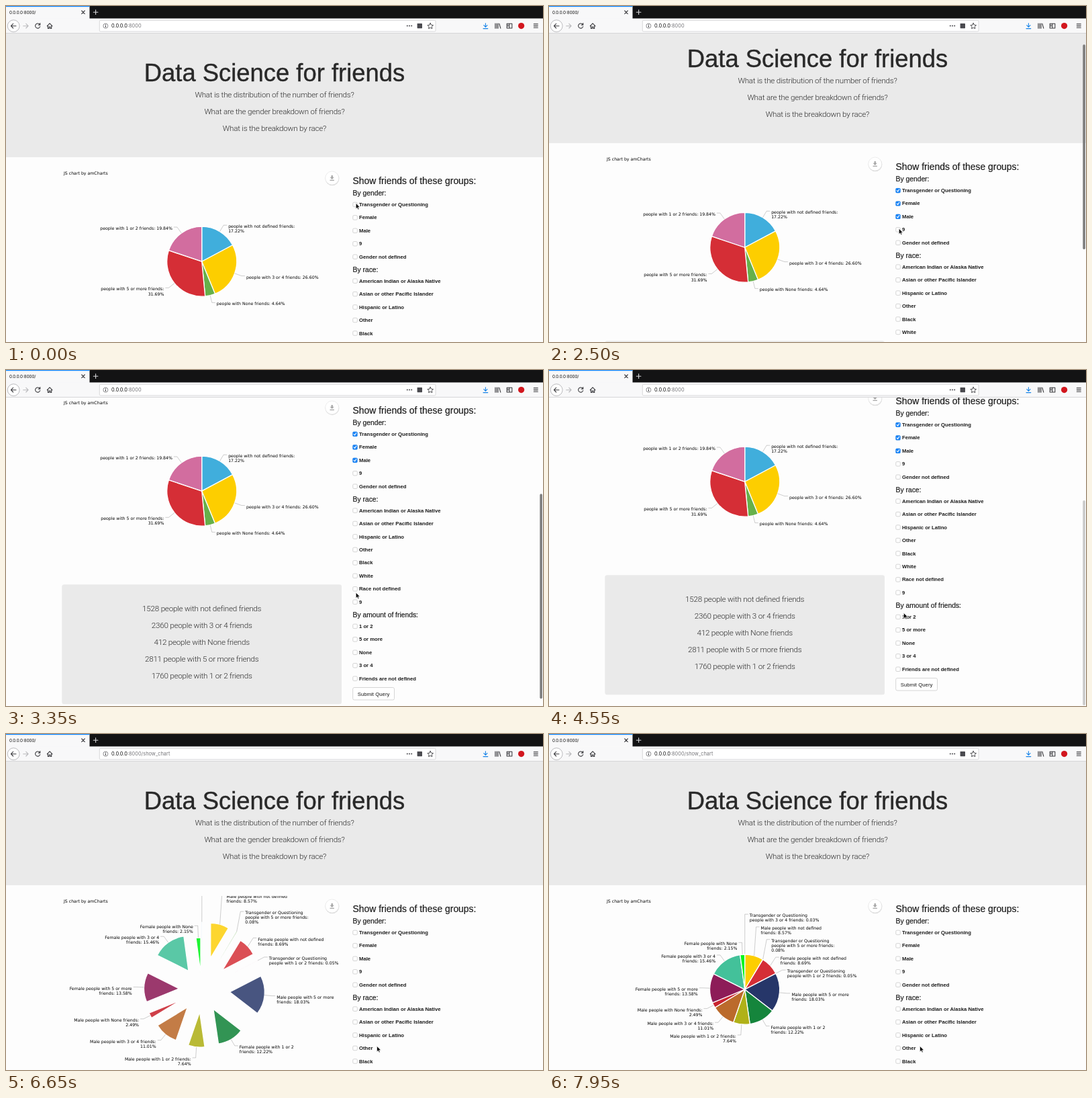
An HTML page that plays this animation: 800 by 500 pixels, repeating every 8 s.

```html
<!DOCTYPE html>
<html lang="en">
<head>
<meta charset="utf-8">
<title>Data Science for friends</title>
<style>
html, body { margin: 0; width: 100%; height: 100%; overflow: hidden; background: #fdfdfd; }
svg { display: block; width: 800px; height: 500px; font-family: "Liberation Sans", Arial, sans-serif; }
text { fill: #1c1c1c; white-space: pre; }
.title { font-size: 36.4px; fill: #292929; stroke: #292929; stroke-width: .4px; text-anchor: middle; }
.lead { font: 300 11.67px Roboto, sans-serif; letter-spacing: -.02em; fill: #2c2c2c; text-anchor: middle; }
.head { font-size: 13.9px; stroke: #1c1c1c; stroke-width: .2px; }
.sub { font-size: 10.3px; stroke: #1c1c1c; stroke-width: .2px; }
.option { font-size: 7.7px; font-weight: bold; }
.button { font-size: 7.8px; }
.chart { font: 6.23px "DejaVu Sans", Verdana, sans-serif; fill: #000; }
.tab { font: 6.2px Inter, sans-serif; fill: #111; }
.url { font: 7.4px Inter, sans-serif; fill: #0c0c0d; }
.line { fill: none; stroke: #3a3a3e; stroke-width: 1.1; stroke-linecap: round; stroke-linejoin: round; }
.tick { fill: none; stroke: #000; stroke-opacity: .32; stroke-width: .6; }
</style>
</head>
<body>
<svg id="stage" viewBox="0 0 800 500"></svg>
<script>
const LOOP = 8000, TOP = 41, MAX_SCROLL = 214;
const CX = 291.7, CY = 380.2, RADIUS = 52, LABEL_RADIUS = 63;
const LOADED = 5900, PIE_START = 6197;

// Slices: percent, colour, label (| breaks the line), vertical label shift
const overview = [
  [17.22, '#40aedc', 'people with not defined friends:|17.22%'],
  [26.60, '#fdce00', 'people with 3 or 4 friends: 26.60%'],
  [4.64, '#66b04a', 'people with None friends: 4.64%'],
  [31.69, '#d52e36', 'people with 5 or more friends:|31.69%'],
  [19.84, '#d26d9f', 'people with 1 or 2 friends: 19.84%']
];
const breakdown = [
  [0.03, '#40aedc', 'Transgender or Questioning|people with 3 or 4 friends: 0.03%', -49],
  [8.57, '#fdce00', 'Male people with not defined|friends: 8.57%', -32.5],
  [0.08, '#66b04a', 'Transgender or Questioning|people with 5 or more friends:|0.08%', -20.5],
  [8.69, '#d52e36', 'Female people with not defined|friends: 8.69%', -5],
  [0.05, '#d26d9f', 'Transgender or Questioning|people with 1 or 2 friends: 0.05%'],
  [18.03, '#263669', 'Male people with 5 or more|friends: 18.03%'],
  [12.22, '#15853c', 'Female people with 1 or 2|friends: 12.22%'],
  [7.64, '#b0b118', 'Male people with 1 or 2 friends:|7.64%', 5],
  [11.01, '#bb6a2b', 'Male people with 3 or 4 friends:|11.01%'],
  [2.49, '#c9252f', 'Male people with None friends:|2.49%'],
  [13.58, '#8d1c58', 'Female people with 5 or more|friends: 13.58%'],
  [15.46, '#43c19a', 'Female people with 3 or 4|friends: 15.46%'],
  [2.15, '#06f51e', 'Female people with None|friends: 2.15%', -7]
];

const text = (x, y, cls, s, extra = '') => `<text x="${x}" y="${y}" class="${cls}" ${extra}>${s}</text>`;
const rect = (x, y, w, h, fill, extra = '') =>
  `<rect x="${x}" y="${y}" width="${w}" height="${h}" fill="${fill}" ${extra}/>`;
const circle = (x, y, r, fill, extra = '') => `<circle cx="${x}" cy="${y}" r="${r}" fill="${fill}" ${extra}/>`;
const line = (d, extra = '') => `<path class="line" d="${d}" ${extra}/>`;
const polar = (turn, r) => [CX + r * Math.sin(turn * 2 * Math.PI), CY - r * Math.cos(turn * 2 * Math.PI)];

function pie(slices) {
  const total = slices.reduce((sum, s) => sum + s[0], 0);
  let from = 0;
  return slices.map(([percent, color, label, shift = 0]) => {
    const to = from + percent / total, mid = (from + to) / 2;
    const side = mid < .5 ? 1 : -1;
    const [ex, ey] = polar(mid, LABEL_RADIUS), y = ey + shift;
    const wedge = `M${CX} ${CY}L${polar(from, RADIUS)}A${RADIUS} ${RADIUS} 0 0 1 ${polar(to, RADIUS)}Z`;
    const stroke = percent < .1 ? 'none' : '#fff';
    const words = label.split('|').map((part, i) =>
      text(ex + 7 * side, y + 4 + i * 7.1, 'chart', part, side < 0 ? 'text-anchor="end"' : '')).join('');
    from = to;
    return `<g class="slice" data-mid="${mid}">
      <path class="wedge" d="${wedge}" fill="${color}" stroke="${stroke}" stroke-width="1.3"/>
      <path class="tick" d="M${polar(mid, RADIUS)}L${ex} ${y}h${5 * side}"/>${words}</g>`;
  }).join('');
}

function options(centerY, labels) {
  return labels.map((label, i) => {
    const y = centerY + i * 19.45;
    return rect(516.8, y - 2.9, 6.5, 6.5, '#fff', 'rx="1.5" stroke="#c2c2c2" stroke-width=".7"') +
      text(526, y + 2.9, 'option', label);
  }).join('');
}

const check = i => {
  const y = 295.3 + i * 19.45;
  return `<g class="check">${rect(516.4, y - 3.4, 7.2, 7.2, '#1a84f6', 'rx="1.6"')}` +
    line(`M518.3 ${y + .3}l1.3 1.5l2.2 -3.4`, 'style="stroke:#fff"') + '</g>';
};

const leads = (x, y, lines) => lines.map((s, i) => text(x, y + i * 25, 'lead', s)).join('');

const page = `
  ${rect(0, TOP, 800, 184, '#eaeaea')}
  ${text(400, 112, 'title', 'Data Science for friends')}
  ${leads(400, 136, ['What is the distribution of the number of friends?',
    'What are the gender breakdown of friends?', 'What is the breakdown by race?'])}
  ${text(86, 250.8, 'chart', 'JS chart by amCharts')}
  ${circle(486, 256.8, 10.4, '#000', 'opacity=".12"')}
  ${circle(485.7, 256, 10, '#fff', 'stroke="#e2e2e2" stroke-width=".6"')}
  <path d="M484.6 252h2.2v2.8h2l-3.1 3.1l-3.1 -3.1h2zM482.5 258.8h6.4v1.2h-6.4z" fill="#a5a5a5"/>
  <g id="overview">${pie(overview)}</g>
  <g id="breakdown" clip-path="url(#chartArea)">${pie(breakdown)}</g>
  ${rect(83.3, 519.3, 416.7, 178, '#eaeaea', 'rx="3.3"')}
  <g id="counts">${leads(291.7, 559, ['1528 people with not defined friends', '2360 people with 3 or 4 friends',
    '412 people with None friends', '2811 people with 5 or more friends', '1760 people with 1 or 2 friends'])}</g>
  ${text(516.6, 264.8, 'head', 'Show friends of these groups:')}
  ${text(516.6, 282, 'sub', 'By gender:')}
  ${options(295.1, ['Transgender or Questioning', 'Female', 'Male', '9', 'Gender not defined'])}
  ${[0, 1, 2].map(check).join('')}
  ${text(516.6, 396, 'sub', 'By race:')}
  ${options(408.8, ['American Indian or Alaska Native', 'Asian or other Pacific Islander', 'Hispanic or Latino',
    'Other', 'Black', 'White', 'Race not defined', '9'])}
  ${text(516.6, 567.8, 'sub', 'By amount of friends:')}
  ${options(581.1, ['1 or 2', '5 or more', 'None', '3 or 4', 'Friends are not defined'])}
  ${rect(516.7, 672.6, 61.8, 18.4, '#fff', 'id="submit" rx="2.2" stroke="#c4c4c4" stroke-width=".7"')}
  ${text(547.6, 684.7, 'button', 'Submit Query', 'text-anchor="middle"')}`;

const browser = `
  ${rect(0, 0, 800, 19, '#131314')}
  ${rect(0, 0, 124.5, 19, '#f8f8f9')}
  ${circle(12, 9.5, 0, '#45a1ff', 'id="burst" clip-path="url(#tabArea)"')}
  ${rect(0, 0, 124.5, 1.2, '#0a84ff')}
  ${text(5, 11.8, 'tab', '0.0.0.0:8000/')}
  ${line('M112.7 7l4.6 4.6M117.3 7l-4.6 4.6', 'stroke-width=".9"')}
  ${line('M130.3 9.2h6.6M133.6 5.9v6.6', 'style="stroke:#d8d8da"')}
  ${rect(0, 18.5, 800, 22, '#f8f8f9')}
  ${rect(0, 40, 800, 1, '#d6d6d8')}
  ${circle(11.2, 29.7, 8.9, '#fff', 'stroke="#a9a9ac" stroke-width=".8"')}
  ${line('M15 29.7h-7.5M10.7 26.4l-3.3 3.3l3.3 3.3')}
  ${line('M25.7 29.7h7.3M29.8 26.4l3.3 3.3l-3.3 3.3', 'style="stroke:#b8b8bb"')}
  ${line('M50.3 27.6a3.6 3.6 0 1 0 .4 3M50.8 25.6v2.6h-2.6', 'id="reload"')}
  ${line('M61.2 29.8l3.9 -3.9l3.9 3.9M62.5 29.5v4h1.7v-2.4h1.8v2.4h1.7v-4')}
  ${rect(139.3, 21.3, 500.7, 16.6, '#fff', 'rx="1.6" stroke="#cacacc" stroke-width=".7"')}
  ${circle(148.4, 29.6, 3.5, 'none', 'stroke="#6e6e72" stroke-width=".8"')}
  ${line('M148.4 29.3v2M148.4 27.6v.1', 'stroke-width=".8"')}
  <text class="url" x="157" y="32.3">0.0.0.0<tspan id="path" fill="#77777b"></tspan></text>
  ${[597.8, 601, 604.2].map(x => circle(x, 29.6, 1, '#4a4a4f')).join('')}
  ${rect(612.6, 26, 7.4, 7.2, '#4a4a4f', 'rx=".6"')}
  ${line('M632.2 25.4l1.3 2.8l3 .4l-2.2 2.1l.5 3l-2.6 -1.4l-2.6 1.4l.5 -3l-2.2 -2.1l3 -.4z', 'style="stroke-width:.9"')}
  ${line('M714.4 25.8v5.2M711.8 28.7l2.6 2.6l2.6 -2.6M711 33.6h6.8', 'style="stroke:#1683e8"')}
  ${line('M728.9 26v7.2M731 26v7.2M733 26v7.2M734.8 26.2l2 7')}
  ${line('M746.2 26.3h7.6v6.7h-7.6zM750 26.3v6.7M747.4 28.2h1.2M747.4 30h1.2')}
  ${circle(767.6, 29.6, 4.6, '#d2161e')}
  ${line('M786.3 26.9h6M786.3 29.6h6M786.3 32.3h6')}`;

const $ = id => document.getElementById(id);
$('stage').innerHTML = `
  <defs>
    <clipPath id="chartArea">${rect(83.3, 241, 416.7, 278, '#000')}</clipPath>
    <clipPath id="tabArea">${rect(0, 1, 124.5, 18, '#000')}</clipPath>
  </defs>
  ${rect(0, 0, 800, 500, '#fdfdfd')}
  <g id="page">${page}</g>
  ${rect(795.3, 0, 3.6, 305, '#7d7d7d', 'id="thumb" rx="1.8"')}
  ${browser}
  <path id="cursor" d="M0 0v8.3l1.9 -1.8l1.3 2.9l1.4 -.6l-1.3 -2.8h2.6z" fill="#000" stroke="#fff" stroke-width=".6"/>`;

const checks = document.querySelectorAll('.check');
const checkTimes = [400, 1150, 2000];
const slices = document.querySelectorAll('#breakdown .slice');

const clamp = v => Math.min(1, Math.max(0, v));
const smooth = u => u * u * (3 - 2 * u);
const linear = u => u;

// Value at time t along [time, value] keys
function track(t, keys, ease = linear) {
  let value = keys[0][1];
  for (let i = 1; i < keys.length; i++) {
    const [t0, v0] = keys[i - 1], [t1, v1] = keys[i];
    if (t >= t0) value = v0 + (v1 - v0) * ease(clamp((t - t0) / (t1 - t0)));
  }
  return value;
}

function bounceOut(u) {
  const k = 7.5625;
  if (u < 1 / 2.75) return k * u * u;
  if (u < 2 / 2.75) return k * (u - 1.5 / 2.75) ** 2 + .75;
  if (u < 2.5 / 2.75) return k * (u - 2.25 / 2.75) ** 2 + .9375;
  return k * (u - 2.625 / 2.75) ** 2 + .984375;
}

const set = (el, attrs) => { for (const key in attrs) el.setAttribute(key, attrs[key]); };
const show = (el, on) => set(el, { visibility: on ? 'visible' : 'hidden' });

function draw(t) {
  const loaded = t >= LOADED;
  const scroll = loaded ? 0 : track(t, [[2400, 0], [2800, 83], [3350, 200], [3550, MAX_SCROLL]]);
  set($('page'), { transform: `translate(0 ${-scroll})` });

  const barOpacity = loaded ? track(t, [[6300, 1], [6550, 0]])
    : track(t, [[2350, 0], [2400, 1], [4400, 1], [4650, 0]]);
  set($('thumb'), { y: 42.3 + scroll * .709, opacity: barOpacity });

  const x = track(t, [[4350, 521.3], [5000, 552.6]], smooth);
  const y = track(t, [[700, 293.6], [1000, 314.7], [1550, 314.7], [1850, 331.2], [4350, 331.2], [5000, 464.6]], smooth);
  set($('cursor'), { transform: `translate(${x} ${y})` });

  checks.forEach((el, i) => show(el, !loaded && t >= checkTimes[i]));
  const hover = t > 4950 && !loaded;
  set($('submit'), { fill: hover ? '#dfdfdf' : '#fff', stroke: hover ? '#a8a8a8' : '#c4c4c4' });

  $('path').textContent = t < 5550 ? ':8000' : ':8000/show_chart';
  $('reload').style.stroke = t > 5450 && t < 6050 ? '#b8b8bb' : '#3a3a3e';
  const burst = clamp((t - 5750) / 350);
  set($('burst'), { r: burst && 9 + 95 * burst, opacity: .65 * (1 - burst) });

  show($('overview'), !loaded);
  show($('breakdown'), loaded);
  slices.forEach((el, i) => {
    const delay = 17 * ((i > 2) + (i > 5) + (i > 11));
    const progress = bounceOut(clamp((t - PIE_START - delay) / 1000));
    const [px, py] = polar(+el.dataset.mid, 5 * RADIUS * (1 - progress));
    set(el, { transform: `translate(${px - CX} ${py - CY})` });
    set(el.firstElementChild, { opacity: progress });
  });
}

function frame() {
  draw(performance.now() % LOOP);
  requestAnimationFrame(frame);
}
frame();
</script>
</body>
</html>
```
